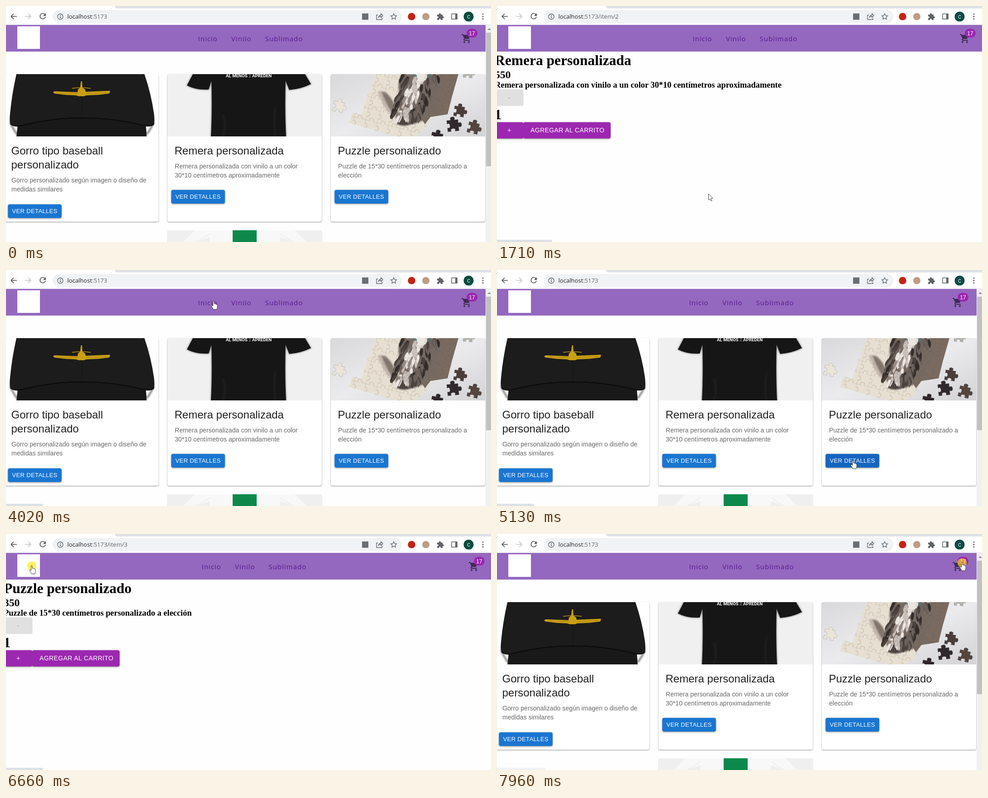
Write an HTML page that moves like this. It is 1072 px wide and 523 px high and loops after 8000 ms.

```html
<!DOCTYPE html>
<html lang="es">
<head>
<meta charset="utf-8">
<title>Tienda</title>
<style>
html, body { margin: 0; width: 100%; height: 100%; overflow: hidden; background: #fff; }
svg { display: block; width: 100%; height: 100%; }
text { white-space: pre; }
.ui { font: 13.1px "Open Sans", sans-serif; fill: #5f6368; }
.nav { font: 15px "Open Sans", sans-serif; letter-spacing: 1px; fill: #551a8b; }
.title { font: 24px "Liberation Sans", Arial, sans-serif; fill: #212121; }
.body { font: 14px "Liberation Sans", Arial, sans-serif; letter-spacing: .08px; fill: #666; }
.btn { font: 13px "Liberation Sans", Arial, sans-serif; letter-spacing: .37px; fill: #fff; }
.big { font-size: 14px; letter-spacing: .4px; }
.serif { font: bold 31.5px "Liberation Serif", "Times New Roman", serif; fill: #000; }
.card { filter: drop-shadow(0 1px .8px #0007); }
.raised { filter: drop-shadow(0 1px 1px #0005) drop-shadow(0 1px 2px #0003); }
.line { fill: none; stroke: #5f6368; stroke-width: 1.6; }
</style>
</head>
<body>
<svg id="stage" viewBox="0 0 1072 523" preserveAspectRatio="none">
  <defs>
    <filter id="soft"><feGaussianBlur stdDeviation="1.6"/></filter>
    <filter id="fuzzy"><feGaussianBlur stdDeviation=".6"/></filter>
    <linearGradient id="table" x2="1" y2="1">
      <stop stop-color="#d9d9dc"/><stop offset=".5" stop-color="#ebebed"/><stop offset="1" stop-color="#d3d2d5"/>
    </linearGradient>
    <pattern id="jigsaw" width="26" height="26" patternUnits="userSpaceOnUse" patternTransform="rotate(14)">
      <path d="M0 0H9q-3-6 4-6t4 6H26M0 0V9q6-3 6 4t-6 4V26M9 26q-3-6 4-6t4 6" fill="none" stroke="#5a4a3c" stroke-opacity=".3"/>
    </pattern>
    <path id="piece" d="M0 0H9q-3-7 4-7t4 7H25V8q7-3 7 4t-7 4V25H16q3-6-4-6t-4 6H0V16q6 3 6-4t-6-4Z"/>
    <clipPath id="shot1"><path d="M-4 151H333q4 0 4 4V289H-4Z"/></clipPath>
    <clipPath id="shot2"><path d="M357 289V155q0-4 4-4H694q4 0 4 4V289Z"/></clipPath>
    <clipPath id="shot3"><path d="M718 289V155q0-4 4-4H1055q4 0 4 4V289Z"/></clipPath>
    <clipPath id="page"><rect y="42" width="1072" height="481"/></clipPath>
  </defs>

  <rect width="1072" height="523" fill="#fefefe"/>

  <g id="home" clip-path="url(#page)"></g>

  <g id="item">
    <text id="name" class="serif" x="-5" y="130.5"></text>
    <text id="price" class="serif" x="-5" y="159.5" style="font-size:23.6px"></text>
    <text id="info" class="serif" x="-5" y="181" style="font-size:18.4px"></text>
    <rect x="-6" y="185" width="64.5" height="36.5" rx="4" fill="#e0e0e0"/>
    <text class="btn big" x="24.5" y="208" style="fill:#a6a6a6">-</text>
    <text class="serif" x="-5.5" y="250.5">1</text>
    <g class="raised" fill="#9c27b0">
      <rect x="-6" y="257.5" width="64.5" height="36" rx="4"/>
      <rect x="58" y="257.5" width="193" height="36" rx="4"/>
    </g>
    <text class="btn big" x="23" y="280">+</text>
    <text class="btn big" x="74" y="280">AGREGAR AL CARRITO</text>
  </g>

  <rect id="bar" y="42" height="59" fill="#9568bf"/>
  <rect x="25" y="45" width="50" height="50" fill="#fff"/>
  <g id="nav" class="nav">
    <text x="424.5" y="78">Inicio</text><text x="498" y="78">Vinilo</text><text x="572.5" y="78">Sublimado</text>
  </g>
  <g id="cart">
    <path transform="translate(1006 60)" fill="#000" fill-opacity=".58" d="M7 18c-1.1 0-2 .9-2 2s.9 2 2 2 2-.9 2-2-.9-2-2-2zM1 2v2h2l3.6 7.6-1.35 2.45c-.16.28-.25.6-.25.95 0 1.1.9 2 2 2h12v-2H7.4c-.14 0-.25-.1-.25-.25l.95-1.75h7.45c.75 0 1.4-.4 1.75-1L20.9 5.5c.5-.8-.1-1.5-.9-1.5H5.2l-.94-2zm16 16c-1.1 0-2 .9-2 2s.9 2 2 2 2-.9 2-2-.9-2-2-2z"/>
    <rect x="1018" y="50.5" width="24" height="19.5" rx="9.75" fill="#9c27b0"/>
    <text class="btn" x="1030" y="64.5" text-anchor="middle" style="font-size:12px;letter-spacing:.1px">17</text>
  </g>

  <g id="scroll">
    <rect x="1060" y="42" width="12" height="481" fill="#f1f1f1"/>
    <rect x="1061" y="59" width="11" height="296" fill="#c1c1c1"/>
    <path d="M1064 53l4-4 4 4z" fill="#8a8a8a"/>
  </g>

  <g id="browser">
    <rect width="1072" height="41" fill="#fff"/>
    <path d="M240 0q2 5.5 8 5.5H1072V0Z" fill="#dee1e6"/>
    <path d="M0 41.5H1072" stroke="#e3e3e8"/>
    <rect x="103" y="9" width="773" height="29" rx="14.5" fill="#f0f3f5"/>
    <path class="line" d="M24 23H11m6-6l-6 6 6 6" style="stroke:#4a4d51"/>
    <path class="line" d="M42 23h13m-6-6l6 6-6 6" style="stroke:#c2c4c7"/>
    <path class="line" d="M86 19a6 6 0 1 0 1 5" style="stroke:#4a4d51"/>
    <path d="M88 16v6h-6z" fill="#4a4d51"/>
    <circle class="line" cx="120" cy="23.5" r="6" style="stroke-width:1.4"/>
    <path class="line" d="M120 22.5v4.5m0-7v1.5"/>
    <text class="ui" x="135.5" y="28"><tspan fill="#202124">localhost</tspan>:5173<tspan id="path"></tspan></text>
    <rect x="787" y="16.5" width="14" height="14" fill="#6a6e73"/>
    <path class="line" d="M822 20h-3v10h12v-3M823 26q1-6 6-6v-3l4 4.5-4 4v-3q-4 0-6 3.5z" style="stroke-width:1.3"/>
    <path class="line" d="M857 17l1.9 4.2 4.6.5-3.4 3.1 1 4.5-4.1-2.3-4.1 2.3 1-4.5-3.4-3.1 4.6-.5z" style="stroke-width:1.3"/>
    <circle cx="896.5" cy="23.5" r="8.3" fill="#c62118"/>
    <circle cx="928" cy="23.5" r="8" fill="#bd9c87"/>
    <path d="M953 19h4q-.5-3 2-3t2 3h4v4q3-.5 3 2t-3 2v4h-4q0-3-2-3t-2 3h-4v-4q3 0 3-2t-3-2z" fill="#5f6368"/>
    <rect class="line" x="985" y="17.5" width="12" height="11.5"/><path d="M993 17h4v12h-4z" fill="#5f6368"/>
    <circle cx="1022.5" cy="23.5" r="11" fill="#074b41"/>
    <text x="1022.5" y="27.5" text-anchor="middle" style="font:11px Roboto,sans-serif;fill:#fff">C</text>
    <g fill="#5f6368"><circle cx="1054" cy="18" r="1.6"/><circle cx="1054" cy="23.3" r="1.6"/><circle cx="1054" cy="28.6" r="1.6"/></g>
  </g>

  <path id="status" fill="#dee1e6"/>
  <circle id="click" r="10.3" fill="#ffe800" fill-opacity=".62"/>
  <g id="cursor">
    <path id="arrow" d="M.5.5V14l3.2-2.8 2 4.8 2.5-1-2-4.7 4-.2z" fill="#fff" stroke="#333" stroke-width=".9"/>
    <path id="hand" d="M-1.5 9V1.2q0-1.5 1.3-1.5T1.2 1.2V6q2.2-1 2.8.6 2-.6 2.4 1 1.8-.3 1.8 1.6v4q0 2.8-1.7 5.3H-.5Q-2 15-4.700 11.700q-1-1.500.4-2.200t2.800 1.500z" fill="#fff" stroke="#222" stroke-width=".9"/>
    <path id="beam" d="M-4-6.5h3l1 1 1-1h3M0-5.5V6M-4 7h3l1-1 1 1h3" fill="none" stroke="#222" stroke-width="1.3"/>
  </g>
</svg>
<script>
const $ = id => document.getElementById(id);
const set = (id, attrs) => { for (const k in attrs) $(id).setAttribute(k, attrs[k]); };
const show = (id, on) => { $(id).style.display = on ? "" : "none"; };

let seed = 11;
const random = () => (seed = (seed * 16807) % 2147483647) / 2147483647;

// Short tapering locks of hair, running down a slanted body
function fur(count) {
  const tones = ["#332c2b", "#4b423f", "#6d625c", "#978b84", "#c9c0b9", "#ece7e2"];
  let out = "";
  for (let i = 0; i < count; i++) {
    const v = random(), side = random() * 2 - 1;
    const x = 922 - v * 38 + side * (40 - v * 14), y = 146 + v * 98;
    const pale = Math.abs(side + .15) < .4 ? 3 : 0;
    const tone = tones[Math.floor(pale + random() * 3)];
    out += `<path d="M${x.toFixed(1)} ${y.toFixed(1)}q${(side * 5 + 2).toFixed(1)} 9 ${(side * 6 - 5).toFixed(1)} 19q-5-8 ${(1 - side * 6).toFixed(1)}-19z" fill="${tone}"/>`;
  }
  return out;
}

const hat = `
  <g clip-path="url(#shot1)">
    <rect x="-4" y="151" width="341" height="138" fill="#fff"/>
    <path d="M9 258Q18 276 24 284M327 258Q318 276 311 284" stroke="#999" stroke-width="5" fill="none" filter="url(#soft)"/>
    <path d="M26 262Q90 246 168 247T309 262L311 289H23Z" fill="#191919"/>
    <path d="M23 151Q13 195 9 238Q7 258 10 262Q22 270 42 263Q105 248 168 248T293 262Q318 270 327 262Q329 257 327 238Q321 195 306 151Z" fill="#1c1c1c"/>
    <path d="M10 262Q22 270 42 263Q105 248 168 248T293 262Q318 270 327 262" fill="none" stroke="#090909" stroke-width="2"/>
    <path d="M168 201V247" stroke="#151515"/>
    <path d="M104 191l4-2 50 2 1-6 5-4 1.500-14h2.500l1 14 6 4 1 5 49-2q5-1 5 2l-2 4-25 3-25 1-6 2h-11l-7-2-22-1-25-3z" fill="#c9a014"/>
    <path d="M146 182.500q20-3 41 0" stroke="#c9a014" stroke-width="1.500" fill="none"/>
    <path d="M112 193l46 1M177 194l46-2" stroke="#a67c0d"/>
  </g>`;

const tee = "M413 151L400 176Q420 187 448 185L454 166Q456 230 453 289H619Q616 230 618 166L626 186Q652 184 674 173L661 151Z";
const shirt = `
  <g clip-path="url(#shot2)">
    <rect x="357" y="151" width="341" height="138" fill="#f0f0f0"/>
    <path d="${tee}" fill="#777" stroke="#aaa" stroke-width="3" filter="url(#soft)"/>
    <path d="${tee}" fill="#161616"/>
    <path d="M480 240Q487 264 480 289M597 225Q590 250 595 289" stroke="#1c1c1c" stroke-width="6" fill="none"/>
    <text x="486" y="158" style="font:bold 9.7px Roboto,sans-serif;fill:#fff">AL MENOS <tspan fill="#777">2</tspan> APREDEN</text>
  </g>`;

const board = "M818 151H1000L986 200L976 240L938 246L926 272L906 289H862L758 259L766 236L786 240L800 196Z";
const pieces = [
  [726, 210, 12, .9, "#eae4d9"], [992, 221, 8, .9, "#4a3d3a"], [974, 254, -6, 1, "#30292d"],
  [1024, 256, 14, .95, "#54453f"], [942, 279, 12, 1, "#2e272c"], [1012, 138, 5, .8, "#b5b1ad"]
];
const cat = `
  <g clip-path="url(#shot3)">
    <rect x="718" y="151" width="341" height="138" fill="url(#table)"/>
    <path d="${board}" fill="#e7dfd2"/>
    <path d="M958 151H1000L986 200L976 240L938 246L926 262L912 240L960 200Z" fill="#7a6a60"/>
    <g filter="url(#soft)">
      <path d="M874 151H960Q974 182 958 212Q942 245 912 258Q880 270 862 254Q872 220 872 200Q862 175 874 151Z" fill="#766a64"/>
      <path d="M821 190Q838 182 853 205L872 234L862 248Q842 238 832 214Z" fill="#c3b7ac"/>
      <path d="M830 190Q844 190 856 214L868 238L856 240Q842 222 830 190Z" fill="#83776f"/>
      <path d="M862 240Q892 232 914 250Q890 272 864 262Z" fill="#4d4440"/>
    </g>
    <g filter="url(#fuzzy)">${fur(150)}</g>
    <path d="M908 151H930Q934 164 919 168Q906 164 908 151Z" fill="#ece6e1" filter="url(#fuzzy)"/>
    <path d="M901 153l7 2M931 155l7-2" stroke="#53798b" stroke-width="3"/>
    <path d="${board}" fill="url(#jigsaw)"/>
    <g stroke="#3334" stroke-width=".8">${pieces.map(([x, y, turn, size, fill]) =>
      `<use href="#piece" transform="translate(${x} ${y}) rotate(${turn}) scale(${size})" fill="${fill}"/>`).join("")}</g>
  </g>`;

const button = (id, x, y) => `
  <rect id="${id}" class="raised" x="${x + .3}" y="${y + .4}" width="118.5" height="30.4" rx="4"/>
  <text class="btn" x="${x + 9.5}" y="${y + 20}">VER DETALLES</text>`;

const lines = (cls, x, y, step, rows) =>
  rows.map((s, i) => `<text class="${cls}" x="${x}" y="${y + i * step}">${s}</text>`).join("");

function card(id, x, art, title, body) {
  const y = 328 + title.length * 31.5;
  return `<rect class="card" x="${x}" y="151" width="341" height="327" rx="4" fill="#fff"/>${art}` +
    lines("title", x + 15.5, 328.5, 31.5, title) +
    lines("body", x + 16, y + .4, 19.7, body) +
    button(id, x + 8, Math.round(y + 47.6));
}

$("home").innerHTML =
  card("b1", -4, hat, ["Gorro tipo baseball", "personalizado"],
    ["Gorro personalizado según imagen o diseño de", "medidas similares"]) +
  card("b2", 357, shirt, ["Remera personalizada"],
    ["Remera personalizada con vinilo a un color", "30*10 centímetros aproximadamente"]) +
  card("b3", 718, cat, ["Puzzle personalizado"],
    ["Puzzle de 15*30 centímetros personalizado a", "elección"]) +
  `<rect x="356" y="497" width="343" height="40" rx="4" fill="#efefef"/>
   <path d="M416 497L392 523H420L450 512V523H606V512L634 523H664L638 497Z" fill="#f8f8f8"/>
   <path d="M420 523L450 505M634 523L606 505" stroke="#e2e2e2"/>
   <rect x="501" y="497" width="53" height="53" fill="#0d8a4b"/>`;

// start, end, from, control, to
const moves = [
  [560, 1210, [1020, 512], [700, 425], [467, 416]],
  [2170, 2350, [467, 416], [370, 380], [287, 354]],
  [2679, 2680, [287, 354], [300, 330], [322, 316]],
  [2949, 2950, [322, 316], [500, 100], [529, 26]],
  [2950, 3490, [529, 26], [495, 124], [459, 69]],
  [4350, 5130, [459, 69], [640, 210], [787, 422]],
  [5530, 6200, [787, 422], [350, -168], [57, 70]],
  [7140, 7960, [57, 70], [560, 273], [1028, 63]]
];

function cursorAt(t) {
  const [t0, t1, a, c, b] = moves.filter(m => t >= m[0]).pop() || moves[0];
  const u = Math.min(1, Math.max(0, (t - t0) / (t1 - t0)));
  const s = u * u * (3 - 2 * u), r = 1 - s;
  return a.map((v, i) => r * r * v + 2 * r * s * c[i] + s * s * b[i]);
}

const within = (t, ...spans) => spans.some(([a, b]) => t >= a && t < b);
const products = {
  2: ["Remera personalizada", "550", "Remera personalizada con vinilo a un color 30*10 centímetros aproximadamente"],
  3: ["Puzzle personalizado", "350", "Puzzle de 15*30 centímetros personalizado a elección"]
};
// start, end, width, opacity
const statuses = [[1480, 2030, 122, 1], [3680, 5250, 82, 1], [5250, 5950, 122, 1], [6450, 6800, 82, 1], [6800, 8000, 107, .4]];

function draw(t) {
  const id = within(t, [1550, 4020]) ? 2 : within(t, [5320, 6800]) ? 3 : 0;
  const [x, y] = cursorAt(t);
  const over = (l, top, w, h) => x >= l && x <= l + w && y >= top && y <= top + h;
  const shift = id ? 8 : 0;

  show("home", !id);
  show("scroll", !id);
  show("item", id);
  if (id) ["name", "price", "info"].forEach((k, i) => { $(k).textContent = products[id][i]; });
  $("path").textContent = id ? "/item/" + id : "";
  set("bar", { width: id ? 1072 : 1060 });
  set("nav", { transform: `translate(${shift})` });
  set("cart", { transform: `translate(${shift * 2})` });

  const visible = t >= 590 && !within(t, [2750, 2950]);
  let link = over(25, 45, 50, 50) || over(1000 + shift * 2, 52, 40, 40) ||
    [[424, 44], [498, 45], [572, 84]].some(([l, w]) => over(l + shift, 60, w, 24));
  [["b1", 4, 439], ["b2", 365, 407], ["b3", 726, 407]].forEach(([b, l, top]) => {
    const hot = visible && !id && over(l, top, 119, 31);
    set(b, { fill: hot ? "#1565c0" : "#1976d2" });
    link = link || hot;
  });

  const beam = y > 8 && y < 38 && x > 110 && x < 780;
  show("cursor", visible);
  show("beam", beam);
  show("hand", link && !beam);
  show("arrow", !link && !beam);
  set("cursor", { transform: `translate(${x.toFixed(1)} ${y.toFixed(1)})` });
  show("click", within(t, [1480, 1550], [3950, 4020], [5250, 5320], [6660, 6800], [7960, 8000]));
  set("click", { cx: x, cy: y + 1 });

  const s = statuses.find(s => within(t, s));
  show("status", s);
  if (s) set("status", { d: `M0 518H${s[2] - 4}q4 0 4 4v1H0Z`, opacity: s[3] });
}

const start = performance.now();
function tick(now) {
  draw(Math.max(0, now - start) % 8000);
  requestAnimationFrame(tick);
}
draw(0);
requestAnimationFrame(tick);
</script>
</body>
</html>
```
